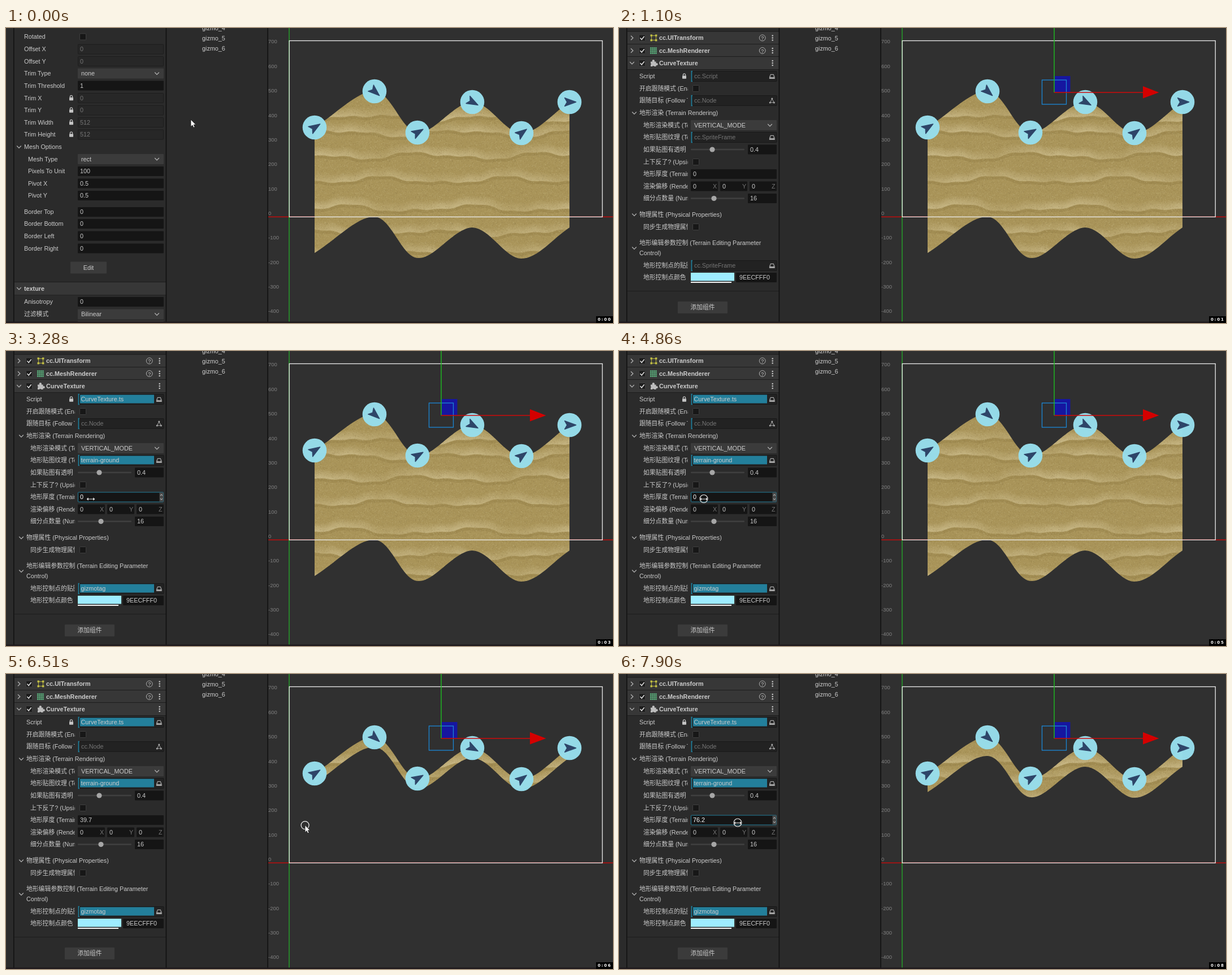
Write an HTML page that moves like this. It is 1074x522 px and loops after 7990 ms.

```html
<!DOCTYPE html>
<html lang="zh">
<head>
<meta charset="utf-8">
<title>Terrain thickness</title>
<style>
html, body { margin: 0; width: 100%; height: 100%; overflow: hidden; background: #2b2b2b; }
svg { display: block; width: 1074px; height: 522px; }
text { font: 10.8px 'Liberation Sans', 'Noto Sans CJK SC', 'Noto Sans CJK', sans-serif; fill: #cccccc; white-space: pre; }
.b { font-weight: bold; }
.dim { fill: #757575; }
.rule { font-size: 9.5px; fill: #808080; }
.clock { font: bold 7px 'DejaVu Sans', sans-serif; fill: #fff; }
</style>
</head>
<body>
<svg id="stage" viewBox="0 0 1074 522" xmlns="http://www.w3.org/2000/svg"></svg>
<script>
const LOOP = 7990;
const stage = document.getElementById('stage');

// ---- drawing helpers ----
const rect = (x, y, w, h, fill, more = '') =>
  `<rect x="${x}" y="${y}" width="${w}" height="${h}" fill="${fill}" ${more}/>`;
const line = (d, color, width = 1.2, more = '') =>
  `<path d="${d}" fill="none" stroke="${color}" stroke-width="${width}" ${more}/>`;
const text = (x, y, s, cls = '', more = '') =>
  `<text x="${x}" y="${y + 3.9}" class="${cls}" ${more}>${s}</text>`;
const label = (x, y, s) => `<g clip-path="url(#labels)">${text(x, y, s)}</g>`;
const down = (x, y) => line(`M${x - 3.8} ${y - 2}l3.8 3.9l3.8-3.9`, '#b4b4b4');
const right = (x, y) => line(`M${x - 2} ${y - 3.8}l3.9 3.8l-3.9 3.8`, '#b4b4b4');
const box = (x, y, w, s, dx = 4) => rect(x, y - 8.5, w, 17, '#151515', 'rx="1"') + text(x + dx, y, s);
const field = (y, s) => box(127, y, 152, s);
const offField = (y, s) =>
  rect(127.5, y - 8.5, 151, 17, '#272727', 'rx="1" stroke="#1d1d1d"') + text(131, y, s, 'dim');
const select = (y, s) =>
  rect(127, y - 9, 152, 18, '#3b3b3b', 'rx="1"') + text(133, y, s) + down(267, y);
const check = (x, y, on) =>
  rect(x - 5.5, y - 5.5, 11, 11, on ? '#1c1c1c' : '#171717', 'rx="1" stroke="#484848" stroke-width=".8"') +
  (on ? line(`M${x - 3.5} ${y}l2.6 3l4.6-5.8`, '#dcdcdc', 1.6) : '');
const lock = y => rect(112, y - 1.2, 7, 5.4, '#c4c4c4', 'rx=".8"') +
  line(`M113.4 ${y - 1}v-1.6a2.1 2.1 0 0 1 4.2 0v1.6`, '#c4c4c4');
const button = (x, y, w, s) => rect(x, y - 10.5, w, 21, '#3b3b3b', 'rx="1"') +
  text(x + w / 2, y, s, '', 'text-anchor="middle"');
const header = (y, h) => rect(15, y, 268, h, '#373737') + rect(15, y - 1, 268, 1, '#1c1c1c');
const spinner = (x, y) => rect(x - 3.5, y - 8, 7, 16, '#4a4a4a') +
  line(`M${x - 2} ${y - 2.5}l2-2.2l2 2.2M${x - 2} ${y + 2.5}l2 2.2l2-2.2`, '#d0d0d0', 1);

// ---- sprite frame inspector ----
function framePanel() {
  let s = label(32, 15.5, 'Rotated') + check(136, 15.5, false);
  [['Offset X', 37.5, 0], ['Offset Y', 59, 0], ['Trim X', 124, 0], ['Trim Y', 145.5, 0],
    ['Trim Width', 167, 512], ['Trim Height', 188.5, 512]].forEach(([name, y, v], i) => {
    s += label(32, y, name) + offField(y, v) + (i > 1 ? lock(y) : '');
  });
  [['Trim Threshold', 102, 1, 32], ['Pixels To Unit', 253.5, 100, 39], ['Pivot X', 275, 0.5, 39],
    ['Pivot Y', 296.5, 0.5, 39], ['Border Top', 325.5, 0, 32], ['Border Bottom', 346.5, 0, 32],
    ['Border Left', 368, 0, 32], ['Border Right', 390, 0, 32], ['Anisotropy', 484.5, 0, 32]]
    .forEach(([name, y, v, x]) => { s += label(x, y, name) + field(y, v); });
  [['Trim Type', 80.5, 'none', 32], ['Mesh Type', 232, 'rect', 39], ['过滤模式', 506.5, 'Bilinear', 32]]
    .forEach(([name, y, v, x]) => { s += label(x, y, name) + select(y, v); });
  s += down(23, 210.5) + text(32, 210, 'Mesh Options') + button(114, 424, 64, 'Edit');
  s += header(450, 22) + rect(15, 472, 268, 1, '#222') + down(23, 461) + text(32, 461, 'texture', 'b');
  return s + rect(127, 518, 152, 4, '#3b3b3b');
}

// ---- component inspector ----
function asset(y, kind, name) {
  const tray = line(`M266.5 ${y + 1.5}v2.5h8.6v-2.5l-1.8-4.6h-5zM266.5 ${y + 1.5}h2.6l1 1.2h1.6l1-1.2h2.4`, '#a8a8a8') +
    rect(266.5, y + 2, 8.6, 2.4, '#a8a8a8');
  const nodes = line(`M270.8 ${y - 3}l-3.6 6.4h7.2z`, '#a8a8a8', 1) +
    [[270.8, -3.4], [267.2, 3.6], [274.4, 3.6]].map(p =>
      `<circle cx="${p[0]}" cy="${y + p[1]}" r="1.5" fill="#a8a8a8"/>`).join('');
  return rect(127.5, y - 9, 151.5, 18, '#222', 'rx="1" stroke="#191919"') +
    line(`M130 ${y - 8.8}h-1.6v17.6h1.6`, '#237f9b', 1.8) +
    text(133, y - 0.5, kind, 'dim') +
    (name ? `<g class="loaded">${rect(131, y - 8, 131, 15, '#237f9b')}${text(132.5, y - 0.5, name)}</g>` : '') +
    (kind === 'cc.Node' ? nodes : tray);
}
const slider = (y, x, v) => rect(127, y - 1.2, 95, 2.4, '#404040', 'rx="1.2"') +
  `<circle cx="${x}" cy="${y}" r="4.6" fill="#a6a6a6"/>` + box(228, y, 51, v);

function componentPanel() {
  let s = '';
  ['cc.UITransform', 'cc.MeshRenderer', 'CurveTexture'].forEach((name, i) => {
    const y = [17.5, 40, 62][i];
    s += header(y - 11, 22) + (i < 2 ? right(23, y) : down(23, y)) + check(41, y, true) +
      text(71, y - 0.3, name, 'b');
    if (i < 2) s += `<circle cx="253.7" cy="${y}" r="5.4" fill="none" stroke="#b0b0b0"/>` +
      text(253.7, y - 0.3, '?', '', 'text-anchor="middle" style="font-size:9px"');
    for (const d of [-4, 0, 4]) s += `<circle cx="271.7" cy="${y + d}" r="1.3" fill="#c4c4c4"/>`;
  });
  s += rect(15, 73, 268, 1, '#1c1c1c');
  s += rect(57.5, 13.5, 8, 8, 'none', 'stroke="#a8a63c" stroke-width="1.2"');
  for (const x of [55.5, 64]) for (const y of [11.5, 20]) s += rect(x, y, 3.4, 3.4, '#c2bf45');
  for (let i = 0; i < 16; i++)
    s += rect(55 + i % 4 * 3.1, 34.2 + (i >> 2) * 3.1, 2.5, 2.5, '#58a878');
  s += '<path d="M56 59.5h3a2.2 2.2 0 1 1 3.6 0h3v3a2 2 0 1 1 0 3.2v2.3h-3.2a2 2 0 0 0-3.4 0h-3v-2.8a2 2 0 0 0 0-3z" fill="#bdbdbd"/>';

  s += label(36, 85.5, 'Script') + lock(85.5) + asset(85.5, 'cc.Script', 'CurveTexture.ts');
  s += label(36, 107, '开启跟随模式 (Enable Follow)') + check(136, 107, false);
  s += label(36, 128.5, '跟随目标 (Follow Target)') + asset(128.5, 'cc.Node');
  s += down(27, 150.5) + text(36, 150, '地形渲染 (Terrain Rendering)');
  s += label(43, 172, '地形渲染模式 (Terrain Mode)') + select(172, 'VERTICAL_MODE');
  s += label(43, 193.5, '地形贴图纹理 (Terrain Texture)') + asset(193.5, 'cc.SpriteFrame', 'terrain-ground');
  s += label(43, 215, '如果贴图有透明') + slider(215, 165, '0.4');
  s += label(43, 237, '上下反了? (Upside Down)') + check(136, 237, false);
  s += label(43, 258.5, '地形厚度 (Terrain Thickness)') + rect(127, 250, 152, 17, '#151515', 'rx="1"');
  s += label(43, 280, '渲染偏移 (Render Offset)');
  ['X', 'Y', 'Z'].forEach((axis, i) => {
    s += box(127 + 52 * i, 280, 48, 0) + text(166 + 52 * i, 280, axis, 'dim');
  });
  s += label(43, 301.5, '细分点数量 (Number)') + slider(301.5, 168, 16);
  s += down(27, 330.5) + text(36, 330, '物理属性 (Physical Properties)');
  s += label(43, 352, '同步生成物理属性') + check(136, 352, false);
  s += down(27, 389.5) + text(36, 380.5, '地形编辑参数控制 (Terrain Editing Parameter') + text(36, 398.5, 'Control)');
  s += label(43, 420.5, '地形控制点的贴图') + asset(420.5, 'cc.SpriteFrame', 'gizmotag');
  s += label(43, 441.5, '地形控制点颜色') + rect(127, 433, 77, 14.5, '#9eecff') +
    rect(127, 449, 72, 2, '#f2f2f2') + box(207, 441.5, 72, '9EECFFF0', 6);
  return s + rect(15, 465, 268, 1, '#1d1d1d') + button(104, 494.5, 88, '添加组件');
}

// ---- terrain ----
const nodes = [[546, 176, -32], [652, 112, 41], [728, 185, -30], [825, 131, 28], [912, 186, -37], [997, 131, 0]];

// Catmull-Rom through the nodes, shifted by dy; the ends mirror their neighbour
function curve(pts, dy) {
  const n = pts.length, mirror = (a, b) => [2 * a[0] - b[0], 2 * a[1] - b[1]];
  const p = [mirror(pts[0], pts[1]), ...pts, mirror(pts[n - 1], pts[n - 2])];
  let d = `${p[1][0]} ${p[1][1] + dy}`;
  for (let i = 1; i < n; i++) {
    const [a, b, c, e] = p.slice(i - 1, i + 3);
    d += `C${b[0] + (c[0] - a[0]) / 6} ${b[1] + dy + (c[1] - a[1]) / 6} ` +
      `${c[0] - (e[0] - b[0]) / 6} ${c[1] + dy - (e[1] - b[1]) / 6} ${c[0]} ${c[1] + dy}`;
  }
  return d;
}
const back = [...nodes].reverse();
const ground = h => `M${curve(nodes, 0)}L${curve(back, h)}Z`;

let seed = 7;
const rnd = () => (seed = seed * 16807 % 2147483647) / 2147483647;
const specks = n => {
  let d = '';
  while (n--) d += `M${(rnd() * 111).toFixed(1)} ${(rnd() * 111).toFixed(1)}h1`;
  return d;
};

function ridge(y0, i) {
  let d = '';
  for (let x = 540; x <= 1002; x += 6) {
    const a = (x - 546) / 222 * Math.PI * 2;
    const y = y0 + 5 * Math.sin(a + i * 1.9) + 2.6 * Math.sin(2 * a + i * 2.7) + 1.2 * Math.sin(5 * a + i);
    d += (d ? 'L' : 'M') + x + ' ' + y.toFixed(1);
  }
  let s = line(d, '#8f7a44', 5, 'opacity=".35" transform="translate(0 4)"');
  for (let k = 0; k < 9; k++)
    s += line(d, `url(#glow${i % 2})`, 2.4, `opacity="${(0.62 * (1 - k / 9)).toFixed(2)}" transform="translate(0 ${-k * 1.7})"`);
  return s;
}
const glow = (id, shift, stops) =>
  `<linearGradient id="${id}" gradientUnits="userSpaceOnUse" x1="${shift}" x2="${shift + 222}" y1="0" y2="0" spreadMethod="repeat">` +
  stops.map((o, i) => `<stop offset="${i / (stops.length - 1)}" stop-color="#d0c192" stop-opacity="${o}"/>`).join('') +
  '</linearGradient>';

const defs = `<defs>
  <clipPath id="labels"><rect x="15" width="106.5" height="522"/></clipPath>
  <clipPath id="panel"><rect x="15" width="268" height="522"/></clipPath>
  <clipPath id="soil"><path id="soilPath"/></clipPath>
  ${glow('glow0', 546, [0.35, 0.95, 0.45, 0.8, 0.35])}${glow('glow1', 610, [0.8, 0.35, 0.6, 1, 0.8])}
  <pattern id="grain" width="111" height="111" patternUnits="userSpaceOnUse">
    ${line(specks(1100), '#d6c797', 1, 'opacity=".3"')}${line(specks(1100), '#6f5c2c', 1, 'opacity=".24"')}
  </pattern></defs>`;

const terrain = '<g clip-path="url(#soil)">' + rect(540, 85, 462, 330, '#a99459') +
  [115, 158, 185, 225, 268, 318, 362, 398].map(ridge).join('') +
  rect(540, 85, 462, 330, 'url(#grain)') + '</g>';

const markers = nodes.map(([x, y, a]) =>
  `<g transform="translate(${x} ${y})"><circle r="21.3" fill="#97deed" fill-opacity=".97"/>` +
  `<path transform="rotate(${a})" d="M11.5 0L-8.5 7.3L-4.3 0L-8.5-7.3Z" fill="#2e4568" stroke="#2e4568" stroke-width="1.4" stroke-linejoin="round"/></g>`).join('');

const gizmo = rect(770.5, 85, 28, 28.5, '#1616a0') +
  rect(748.5, 92, 43, 43, 'none', 'stroke="#1b87d6" stroke-width="1.3"') +
  line('M770 0V114', '#1fbf22', 1.4) + line('M770 114H928', '#cf0a0a', 1.4) +
  '<path d="M927 103L955.5 114L927 124.5Z" fill="#d40000"/>';

// ---- scene ----
let view = rect(464, 0, 610, 522, '#303030');
for (let v = 700; v >= -400; v -= 100) view += text(464, 327 - v * 0.4335, v, 'rule');
view += rect(464, 333.5, 610, 1.4, '#c80a0a') + rect(500.3, 0, 1.4, 522, '#25a52a');

stage.innerHTML = defs + rect(0, 0, 1074, 522, '#2b2b2b') + view + terrain +
  rect(501.2, 22.5, 554, 311.8, 'none', 'stroke="#ececec" stroke-width="1.3"') +
  markers + `<g id="gizmo">${gizmo}</g>` +
  text(347, 0, 'gizmo_4') + text(347, 18, 'gizmo_5') + text(347, 36, 'gizmo_6') +
  `<g clip-path="url(#panel)"><g id="frame">${framePanel()}</g><g id="comp">${componentPanel()}
    <g id="hover">${rect(127.5, 250, 151, 17, 'none', 'rx="1" stroke="#237f9b"')}${spinner(275, 258.5)}</g>
    <g id="hoverX">${spinner(173, 280)}</g>${text(131, 258.5, '0', '', 'id="value"')}</g></g>` +
  rect(13, 0, 1.6, 522, '#111') + rect(282.6, 0, 1.6, 522, '#111') + rect(462.4, 0, 1.6, 522, '#111') +
  rect(0, 519.5, 1074, 2.5, '#1f191c') +
  `<g id="cursor"><circle id="press" r="7" fill="none" stroke="#f4f4f4" stroke-width="1.2"/>
    <path id="arrow" d="M0 0V12.6L2.9 9.9L4.9 14.2L7 13.2L5.1 9.1H8.8Z" fill="#fff" stroke="#111" stroke-width=".7"/>
    <path id="resize" d="M-7.5 .5l3.4-3.2v2.4h8.2v-2.4l3.4 3.2l-3.4 3.2v-2.4h-8.2v2.4z" fill="#fff" stroke="#111" stroke-width=".6"/></g>` +
  rect(1044, 510, 30, 12, '#000') +
  '<text id="clock" class="clock" x="1047 1053.6 1058.3 1065" y="518.2"></text>';

// ---- timeline ----
const path = [
  [0, 327, 162], [50, 327, 162], [450, 400, -20], [1549, 400, -20], [1550, 262, 88], [1730, 120, 215],
  [1830, 68, 262], [1920, 99, 280], [2050, 99, 280], [2460, 143, 270], [2830, 149, 263], [3000, 148, 263],
  [3280, 150, 261.5], [5409, 150, 261.5], [5410, 157, 262], [5590, 165, 262], [5900, 165, 262], [6420, 550, 268],
  [6510, 531, 267.5], [6600, 360, 276], [6690, 165, 264], [6750, 165, 264], [7450, 530, 268], [7530, 520, 270],
  [7810, 215, 264], [7900, 210, 263], [LOOP, 210, 263]];
const ticks = [920, 1830, 2830, 3840, 4860, 5790, 6780, 7810];
const presses = [[4490, 6560], [6780, 7490], [7890, LOOP]];

function cursorAt(t) {
  const i = path.findIndex(k => k[0] > t), a = path[i - 1], b = path[i];
  const u = (t - a[0]) / (b[0] - a[0]);
  return [a[1] + (b[1] - a[1]) * u, a[2] + (b[2] - a[2]) * u];
}
function thicknessAt(t, x) {
  if (t < 5410) return 0;
  if (t < 6420) return (x - 153) / 10;
  if (t < 6750) return 39.7;
  return t < 7450 ? 39.7 + (x - 165) / 10 : 76.2;
}

const el = id => document.getElementById(id);
const show = (node, on) => node.setAttribute('visibility', on ? 'visible' : 'hidden');
const display = (node, on) => { node.style.display = on ? '' : 'none'; };
const loaded = [...document.querySelectorAll('.loaded')];
let lastHeight = -1;

function draw(t) {
  const [x, y] = cursorAt(t);
  const selected = t >= 920;
  const inside = selected && x > 127 && x < 279 && y > 250 && y < 267;
  const value = thicknessAt(t, x);
  const height = (value || 512) * 0.4335;

  display(el('frame'), !selected);
  display(el('comp'), selected);
  display(el('gizmo'), selected);
  loaded.forEach(g => display(g, t >= 1190));
  display(el('hover'), inside);
  display(el('hoverX'), x > 127 && x < 176 && y > 269 && y < 289);
  el('value').textContent = value ? +value.toFixed(1) : 0;
  el('value').style.fill = inside ? '#fff' : '';

  if (height !== lastHeight) el('soilPath').setAttribute('d', ground(height));
  lastHeight = height;

  el('cursor').setAttribute('transform', `translate(${x.toFixed(1)} ${y.toFixed(1)})`);
  show(el('arrow'), !inside);
  show(el('resize'), inside);
  show(el('press'), presses.some(([a, b]) => t >= a && t < b));
  el('clock').textContent = '0:0' + ticks.filter(k => t >= k).length;
}

const start = performance.now();
function loop() {
  draw((performance.now() - start) % LOOP);
  requestAnimationFrame(loop);
}
loop();
</script>
</body>
</html>
```
